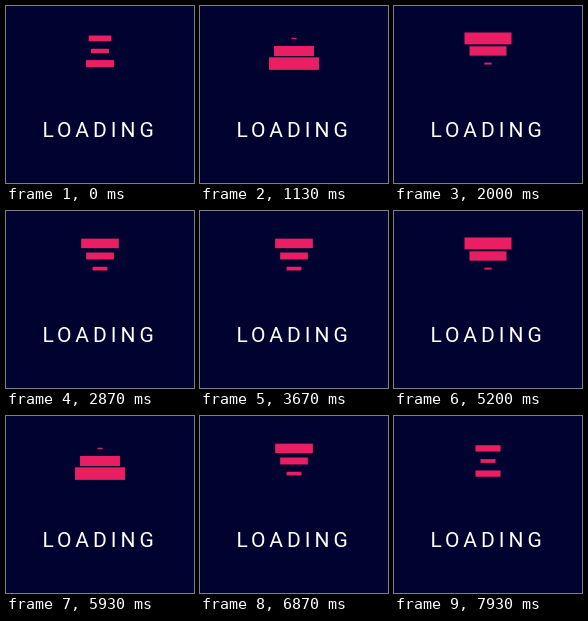
An HTML page for the animation above (8 s loop, 188x177 px).

```html
<!DOCTYPE html>
<html lang="en">
<head>
<meta charset="utf-8">
<title>Loading</title>
<style>
  html, body { margin: 0; width: 100%; height: 100%; overflow: hidden; background: #000230; }
  svg { display: block; width: 188px; height: 177px; }
  rect { fill: #e91e63; }
  text { fill: #fff; font: 400 21px Roboto, sans-serif; letter-spacing: 4px; }
</style>
</head>
<body>
<svg viewBox="0 0 188 177">
  <rect/><rect/><rect/>
  <text x="36.4" y="131">LOADING</text>
</svg>
<script>
  const PERIOD = 800, START = 355, CENTER_X = 94;
  const WIDTH = 50, HEIGHT = 12.6;

  // Each bar scales through start, middle and end, then jumps back to start.
  const bars = [[1, .5, .1], [.8, .3, .8], [.1, .5, 1]];
  const rects = document.querySelectorAll('rect');

  const bezier = (a, b, u) => 3 * a * u * (1 - u) ** 2 + 3 * b * u * u * (1 - u) + u ** 3;

  // The CSS "ease" curve, solved by bisection.
  function ease(x) {
    let low = 0, high = 1;
    for (let i = 0; i < 24; i++) {
      const mid = (low + high) / 2;
      if (bezier(.25, .25, mid) < x) low = mid; else high = mid;
    }
    return bezier(.1, 1, low);
  }

  function draw(time) {
    const phase = ((time - START + PERIOD) % PERIOD) / PERIOD * 2;
    const segment = Math.floor(phase);
    const progress = ease(phase - segment);
    bars.forEach((stops, i) => {
      const scale = stops[segment] + (stops[segment + 1] - stops[segment]) * progress;
      const w = WIDTH * scale, h = HEIGHT * scale;
      const attributes = { x: CENTER_X - w / 2, y: 45 + (i - 1) * HEIGHT - h / 2, width: w, height: h };
      for (const name in attributes) rects[i].setAttribute(name, attributes[name]);
    });
  }

  const begin = performance.now();
  function tick() {
    draw((performance.now() - begin) % 8000);
    requestAnimationFrame(tick);
  }
  draw(0);
  requestAnimationFrame(tick);
</script>
</body>
</html>
```
